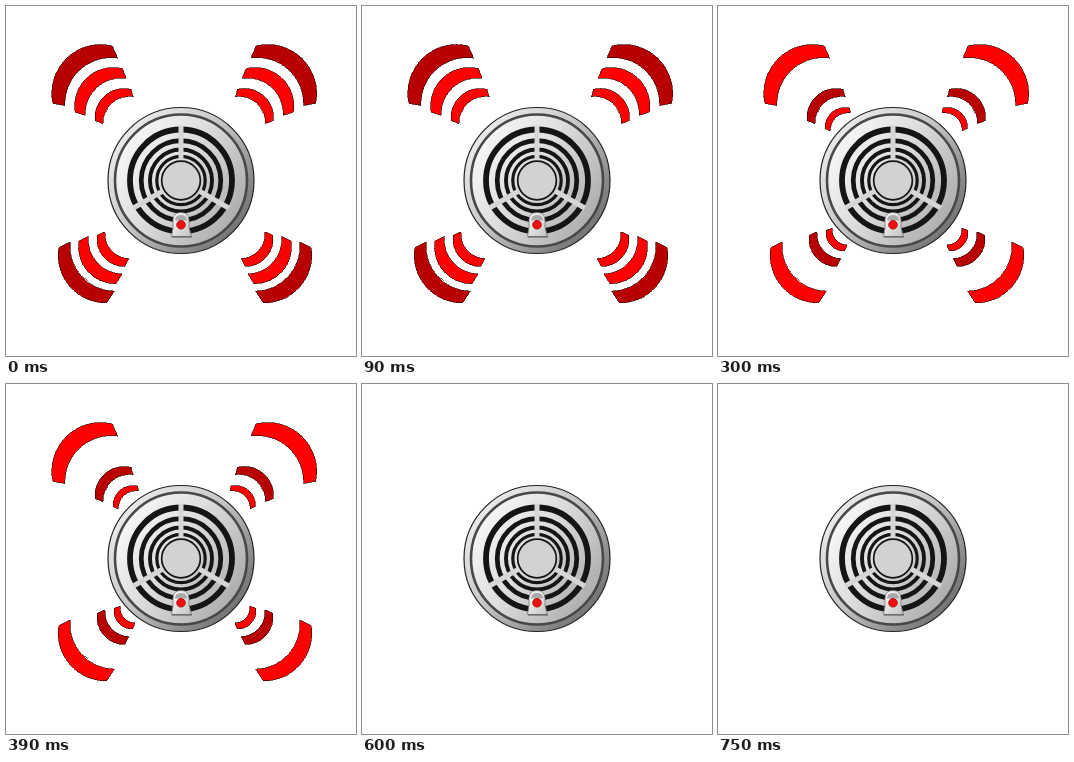
These frames come from a looping animation (350x350 px, 0.85 s). An HTML page:

```html
<!DOCTYPE html>
<html lang="en">
<head>
<meta charset="utf-8">
<title>Smoke alarm</title>
<style>
html, body { margin: 0; width: 100%; height: 100%; overflow: hidden; background: #fff; }
svg { display: block; width: 350px; height: 350px; }
</style>
</head>
<body>
<svg viewBox="0 0 350 350">
  <defs>
    <linearGradient id="rim" x1=".1" y1=".15" x2=".9" y2=".85">
      <stop offset="0" stop-color="#ececec"/>
      <stop offset=".45" stop-color="#c6c6c6"/>
      <stop offset="1" stop-color="#707070"/>
    </linearGradient>
    <linearGradient id="face" x1=".05" y1=".2" x2=".95" y2=".8">
      <stop offset="0" stop-color="#f8f8f8"/>
      <stop offset=".45" stop-color="#dcdcdc"/>
      <stop offset="1" stop-color="#ababab"/>
    </linearGradient>
    <linearGradient id="tab" x1="0" y1="0" x2="1" y2="1">
      <stop offset="0" stop-color="#fff"/>
      <stop offset="1" stop-color="#c0c0c0"/>
    </linearGradient>
  </defs>
  <g id="waves" stroke="#200" stroke-width=".6" shape-rendering="crispEdges"></g>
  <g transform="translate(175 174.5)">
    <circle r="73" fill="url(#rim)" stroke="#222" stroke-width="1.2"/>
    <circle r="66" fill="url(#face)" stroke="#484848" stroke-width="2.6"/>
    <g id="slots" fill="none" stroke="#151515"></g>
    <g id="spokes" stroke="#d6d6d6" stroke-width="5"></g>
    <circle r="18.5" fill="#d2d2d2"/>
    <path d="M-9.500 56L-8 47V40Q-8 32 0 32T8 40V47L10.500 56Z" fill="url(#tab)" stroke="#777" stroke-width=".8"/>
    <path d="M-6 40Q-6 34.500 0 34.500T6 40Z" fill="#aaa"/>
    <path d="M-9 56.500H11" stroke="#555"/>
    <circle cy="44.300" r="4.300" fill="#f01010" stroke="#a00" stroke-width=".8"/>
  </g>
</svg>
<script>
const NS = 'http://www.w3.org/2000/svg';
const $ = id => document.getElementById(id);

function add(parent, tag, attrs) {
  const el = document.createElementNS(NS, tag);
  for (const k in attrs) el.setAttribute(k, attrs[k]);
  return parent.appendChild(el);
}

// A quarter arc touching x on the left and y above (dir 1) or below (dir -1);
// over and under lengthen its two ends, in degrees
function arc(x, y, r, dir, over, under) {
  const at = deg => {
    const a = deg * Math.PI / 180;
    return [x + r + r * Math.cos(a), y + dir * (r + r * Math.sin(a))];
  };
  return { r, from: at(-90 + over), to: at(-180 - under) };
}

function band(x, y, r, thick, dir, ends) {
  const out = arc(x, y, r, dir, ends[0], ends[1]);
  const inn = arc(x + thick, y + dir * thick, r - 2.5, dir, ends[2], ends[3]);
  const sweep = dir > 0 ? 0 : 1;
  return `M${out.from}A${r} ${r} 0 0 ${sweep} ${out.to}` +
    `L${inn.to}A${inn.r} ${inn.r} 0 0 ${1 - sweep} ${inn.from}Z`;
}

const upper = i => band(107 - 16.8 * i - 1.2 * i * i, 101.5 - 18 * i - i * i,
  20 + 8.7 * i + 0.3 * i * i, 5.3 + 2.6 * i, 1, [14, 3 + 3 * i, 8, 2]);
const lower = i => band(108 - 16.2 * i - 0.8 * i * i, 245 + 14.6 * i + 0.9 * i * i,
  18 + 8.7 * i + 0.4 * i * i, 6 + 1.9 * i, -1, [1, 9, -1, 5]);

function pair(g, d, sum) {
  add(g, 'path', { d });
  add(g, 'path', { d, transform: `translate(${sum} 0) scale(-1 1)` });
}

const COUNT = 4;
const rings = Array.from({ length: COUNT }, (_, i) => {
  const g = add($('waves'), 'g', {});
  pair(g, upper(i), 356.5);
  pair(g, lower(i), 358);
  return g;
});

for (let i = 0; i < 5; i++)
  add($('slots'), 'circle', { r: 51 * 0.78 ** i, 'stroke-width': 5.8 * 0.82 ** i });
for (let i = 0; i < 3; i++)
  add($('spokes'), 'path', { d: 'M0 -21V-55', transform: `rotate(${i * 120})` });

const LOOP = 850, STEP = 150;

// One ring is missing at each step, the ring inside the gap is dark; then a pause
function draw(t) {
  const step = Math.floor((t % LOOP) / STEP);
  const front = (step + COUNT - 1) % COUNT;
  rings.forEach((g, i) => {
    g.setAttribute('display', step >= COUNT || i === step ? 'none' : 'inline');
    g.setAttribute('fill', i === front ? '#b80000' : '#ff0000');
  });
}

const start = performance.now();
function tick() {
  draw(performance.now() - start);
  requestAnimationFrame(tick);
}
tick();
</script>
</body>
</html>
```
